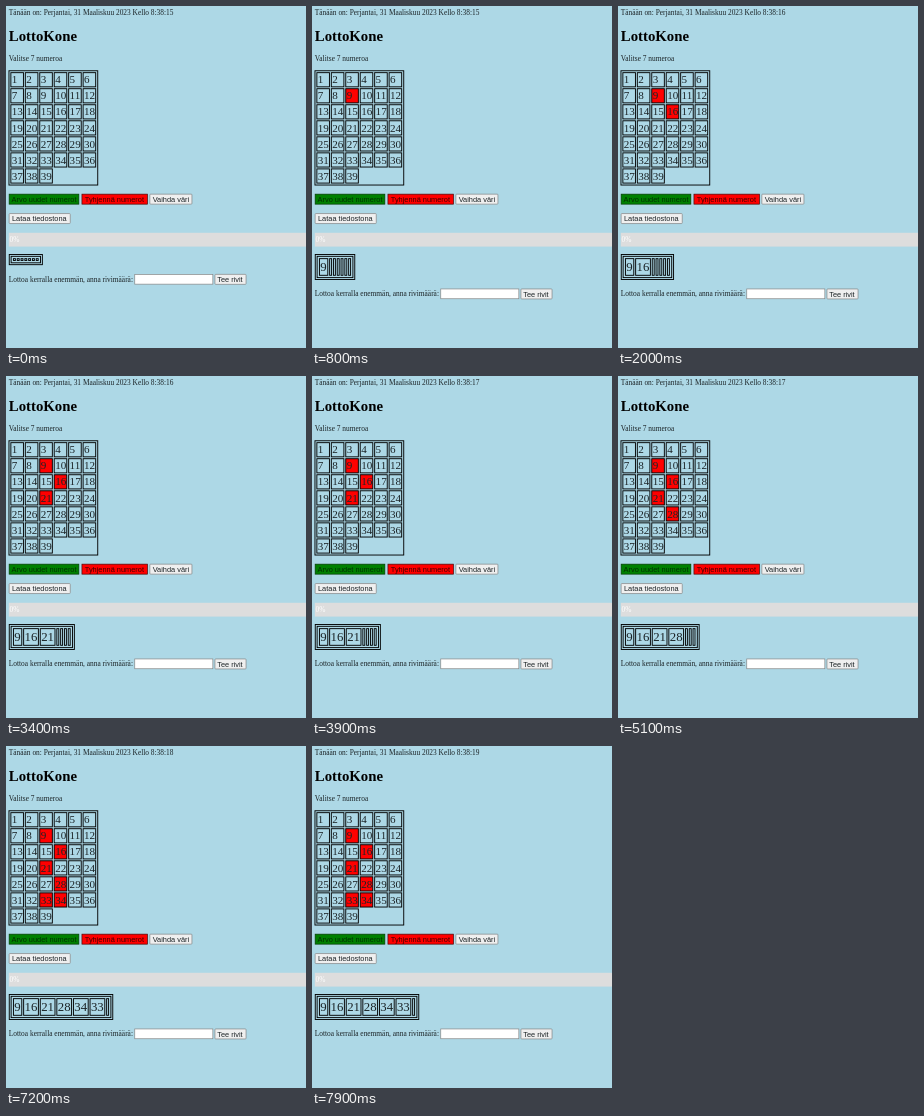
An HTML page that plays this animation: 300 by 342 pixels, repeating every 8 s.

```html
<!DOCTYPE html>
<html lang="fi">
<head>
<meta charset="utf-8">
<title>LottoKone</title>
<style>
  html, body { margin: 0; width: 100%; height: 100%; overflow: hidden; background: #add8e6; }
  svg { display: block; width: 300px; height: 342px; }
  text { font: 7.4px "Liberation Serif", "Times New Roman", serif; fill: #1c2427; white-space: pre; }
  .title { font-size: 14.8px; font-weight: bold; fill: #000; }
  .ui { font-family: "Liberation Sans", Arial, sans-serif; }
  .cell { font-size: 11.1px; }
  .pick { font-size: 12.8px; }
</style>
</head>
<body>
<svg id="stage" viewBox="0 0 300 342"></svg>
<script>
const LOOP = 8000;
const LEFT = 2.8;
const LINE = 0.93;
const PAD = 0.46;
const PICKS = [[800, 9], [2000, 16], [3400, 21], [5100, 28], [6000, 34], [7200, 33]];
const SLOTS = 7;
const stage = document.getElementById("stage");

function add(parent, tag, attrs, content = "") {
  const el = document.createElementNS("http://www.w3.org/2000/svg", tag);
  for (const key in attrs) el.setAttribute(key, attrs[key]);
  el.textContent = content;
  parent.append(el);
  return el;
}

const label = (parent, x, y, content, cls = "", fill) => {
  const el = add(parent, "text", { x, y, class: cls }, content);
  if (fill) el.style.fill = fill;
  return el;
};

// Rectangle whose border lies inside its bounds
const box = (parent, x, y, width, height, fill = "none", stroke = "#000", line = LINE) =>
  add(parent, "rect", {
    x: x + line / 2, y: y + line / 2, width: width - line, height: height - line,
    fill, stroke, "stroke-width": line
  });

function button(parent, x, y, width, content, textX, fill = "#efefef", stroke = "#858585", color) {
  box(parent, x, y, width, 10.7, fill, stroke, 0.7).setAttribute("rx", fill === "#efefef" ? 0.8 : 0);
  label(parent, textX, y + 8, content, "ui", color);
}

const clock = label(stage, LEFT, 9.4, "");
label(stage, LEFT, 34.7, "LottoKone", "title");
label(stage, LEFT, 55, "Valitse 7 numeroa");

// Number grid
box(stage, 2.5, 64.3, 89.7, 115.2);
const cells = {};
for (let n = 1; n <= 39; n++) {
  const x = 4.4 + ((n - 1) % 6) * 14.45;
  const y = 66.2 + Math.floor((n - 1) / 6) * 16.04;
  cells[n] = box(stage, x, y, 13.5, 15.1);
  label(stage, x + LINE + PAD, y + 11.2, n, "cell");
}

button(stage, LEFT, 187.8, 70.4, "Arvo uudet numerot", 5.6, "#008000", "#053a05", "#003000");
button(stage, 75.6, 187.8, 66.2, "Tyhjennä numerot", 78.8, "#ff0000", "#4a0808", "#400000");
button(stage, 143.5, 187.8, 42.8, "Vaihda väri", 146.7);
button(stage, LEFT, 207.2, 61.8, "Lataa tiedostona", 6);

// Progress bar
add(stage, "rect", { x: LEFT, y: 226.8, width: 300 - LEFT, height: 13.8, fill: "#ddd" });
label(stage, 3.6, 236, "0%", "", "#fff");

const picked = add(stage, "g", {});

const form = add(stage, "g", {});
label(form, LEFT, 275.6, "Lottoa kerralla enemmän, anna rivimäärä:");
box(form, 128.4, 268, 78.8, 10.5, "#fff", "#858585", 0.7);
button(form, 208.6, 268, 31.8, "Tee rivit", 211.2);

function drawPicked(numbers) {
  picked.replaceChildren();
  const gap = LINE + LINE;
  const cellHeight = gap + 2 * PAD + (numbers.length ? 14.8 : 0);
  const edge = 3 * LINE + PAD;
  let x = LEFT + edge + LINE;
  for (let i = 0; i < SLOTS; i++) {
    const content = String(numbers[i] ?? "");
    const width = 2.87 + content.length * 6.4;
    box(picked, x, 248 + edge + LINE, width, cellHeight);
    if (content) label(picked, x + LINE + PAD, 265.4, content, "pick");
    x += width + LINE;
  }
  const width = x + edge - LEFT;
  const height = cellHeight + gap + 2 * edge;
  box(picked, LEFT, 248, width, height);
  box(picked, LEFT + gap, 248 + gap, width - 2 * gap, height - 2 * gap);
}

let shown = -1;

function render(t) {
  const second = 15 + Math.floor((t + 100) / 2000);
  clock.textContent = `Tänään on: Perjantai, 31 Maaliskuu 2023 Kello 8:38:${second}`;

  const numbers = PICKS.filter(([at]) => t >= at).map(([, n]) => n);
  if (numbers.length === shown) return;
  shown = numbers.length;
  for (const [, n] of PICKS) cells[n].setAttribute("fill", numbers.includes(n) ? "#ff0000" : "none");
  drawPicked(numbers);
  form.setAttribute("transform", `translate(0 ${shown ? 14.6 : 0})`);
}

const start = performance.now();
function tick() {
  render((performance.now() - start) % LOOP);
  requestAnimationFrame(tick);
}
tick();
</script>
</body>
</html>
```
